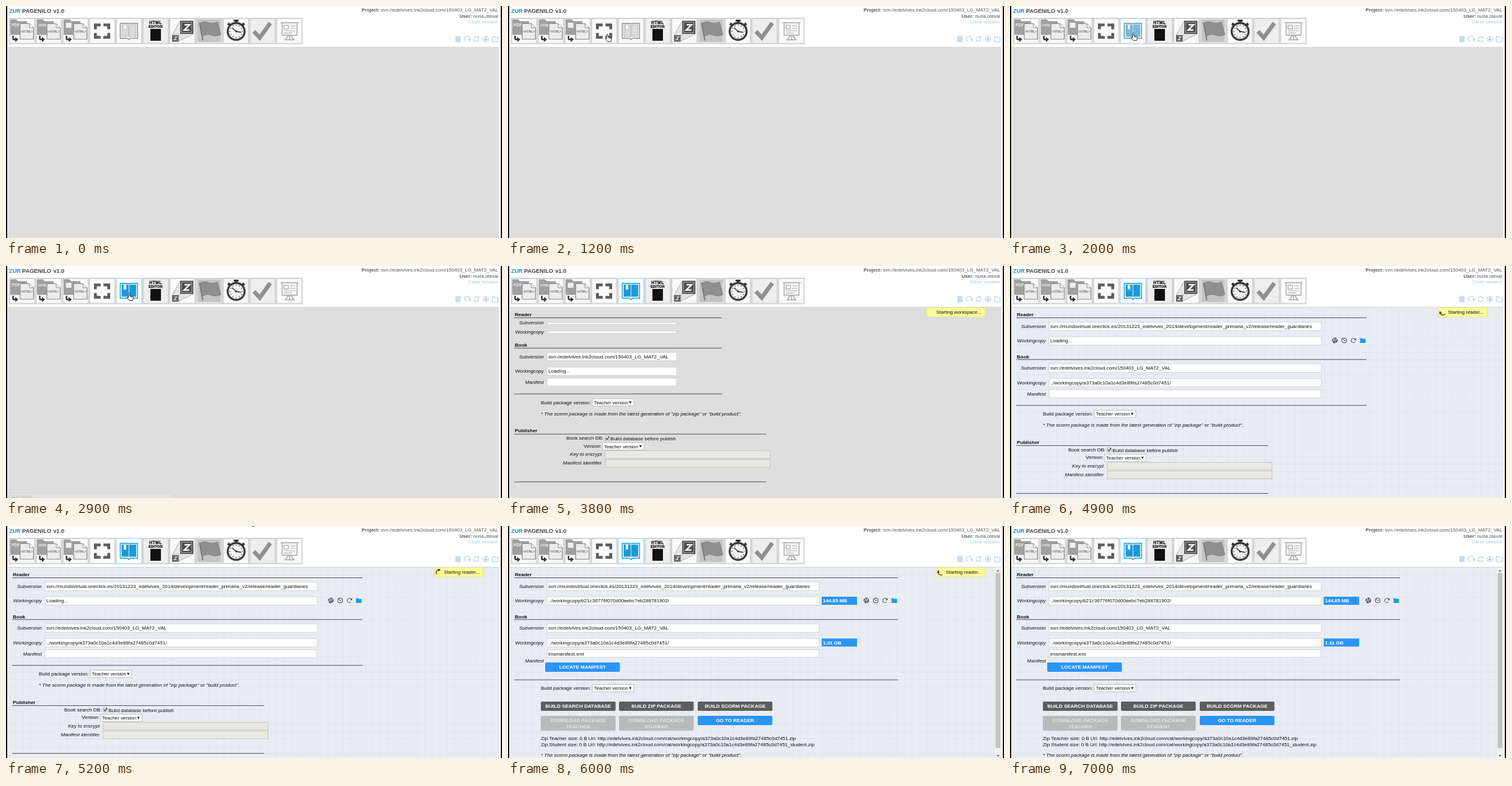
Recreate the animation shown at these times as an HTML page. Size 800x374 px, loop 7.1 s.

```html
<!DOCTYPE html>
<html lang="en">
<head>
<meta charset="utf-8">
<title>Workspace start</title>
<style>
html, body { margin: 0; width: 100%; height: 100%; overflow: hidden; background: #fff; }
svg { display: block; width: 800px; height: 374px; }
text { font-family: "Liberation Sans", Arial, sans-serif; font-size: 8px; fill: #111; white-space: pre; }
.b { font-weight: bold; }
.i { font-style: italic; }
.head { font-size: 7.8px; fill: #555; }
.link { font-size: 7.8px; fill: #9ccbee; }
</style>
</head>
<body>
<svg id="stage" viewBox="0 0 800 374" xmlns="http://www.w3.org/2000/svg"></svg>
<script>
const LOOP = 7100;
const BLUE = "#2a95f5";

const esc = s => s.replace(/&/g, "&amp;").replace(/</g, "&lt;").replace(/>/g, "&gt;");
const text = (x, y, s, cls = "", more = "") => `<text x="${x}" y="${y}" class="${cls}" ${more}>${esc(s)}</text>`;
const endText = (x, y, s, cls = "") => text(x, y, s, cls, 'text-anchor="end"');
const midText = (x, y, s, cls, more) => text(x, y, s, cls, `text-anchor="middle" ${more}`);
const rect = (x, y, w, h, fill, more = "") => `<rect x="${x}" y="${y}" width="${w}" height="${h}" fill="${fill}" ${more}/>`;
const path = (d, fill = "none", stroke = "none", w = 1, more = "") =>
  `<path d="${d}" fill="${fill}" stroke="${stroke}" stroke-width="${w}" ${more}/>`;
const group = (id, body, more = "") => `<g id="${id}" ${more}>${body}</g>`;
const at = (x, y, body, scale = 1) => `<g transform="translate(${x} ${y}) scale(${scale})">${body}</g>`;

// Toolbar icons, drawn in a 43 x 42 cell
const cellX = i => 4.4 + 43.1 * i;
const cell = (i, fill, stroke = "#d2d2d2") =>
  rect(cellX(i) + 1, 20, 41.1, 40.5, fill, `stroke="${stroke}" stroke-width="2"`);

function convertIcon(label) {
  return path("M3 3h9l2.5 3H29v21H3z", "#a0a0a0", "#8c8c8c", .8) + label +
    path("M18.5 9.5h15l6.5 6.5v18.5H18.5z", "#ececec", "#8b8b8b", 1.2) + path("M33.5 9.5V16H40", "#fafafa", "#8b8b8b") +
    midText(29.3, 24.3, "<HTML>", "b", 'style="font-size:4.8px;fill:#777"') +
    path("M7 29v4.5q0 1.5 1.5 1.5h3", "none", "#333", 2.4) + path("M10.5 31l5 4-5 4z", "#333");
}

function bookIcon(main, page) {
  return path("M7.5 9H20l1.5 1.2L23 9h12.5v24H24l-2.5 2-2.5-2H7.5z", "#fff", main, 1.4) +
    path("M10 11.2h9.8l1 1v18H10zM33 11.2h-9.8l-1 1v18H33z", page, main, .6) +
    path("M13 11h4.2v9.5l-2.1-2.3-2.1 2.3z", "#fff", main, .5);
}

function watchIcon() {
  let ticks = "";
  for (let k = 0; k < 12; k++) ticks += `<path d="M0-11.2V-9" stroke="#444" transform="rotate(${k * 30})"/>`;
  return at(22, 22, rect(-4, -19, 8, 3, "#333") + rect(-2, -17, 4, 4, "#333") +
    path("M-13-13l3 3M13-13l-3 3", "none", "#333", 4) +
    '<circle r="13.7" fill="#f3f3f3" stroke="#3a3a3a" stroke-width="3.2"/>' + ticks +
    path("M-6.5-6L0 0l8 1.5", "none", "#333", 1.5) + '<circle r="1.6" fill="#333"/>');
}

const zTile = size => at(0, 0, rect(0, 0, 21, 21, "#4b4b4b") +
  rect(2.2, 2.2, 16.6, 16.6, "none", 'stroke="#b5b5b5" stroke-width="1"') +
  path("M7 6.2h8.2L6.4 14.8h8.4", "none", "#eee", 2.4), size / 21);

const fileLabel = s => text(4.5, 14, s, "b", `style="font-size:${s.length > 3 ? 5.5 : 7}px;fill:#eee"`);
const icons = [
  convertIcon(fileLabel("PDF")),
  convertIcon(fileLabel("HTML")),
  convertIcon(rect(6, 8, 9, 8, "#eee")),
  path("M10.5 18.5v-7h8.5M23.5 11.5H32v7M32 24.5v7h-8.5M19 31.5h-8.5v-7", "none", "#5c5c5c", 4.6),
  bookIcon("#8d8d8d", "#dcdcdc"),
  midText(21.5, 9.8, "HTML", "b", 'stroke="#111" stroke-width=".3" style="font-size:6.5px;letter-spacing:.5px"') +
    midText(21.5, 15.8, "EDITOR", "b", 'stroke="#111" stroke-width=".3" style="font-size:5.6px;letter-spacing:.3px"') +
    rect(13, 18, 17, 19, "#111"),
  path("M18 5L5 28v10h10l24-12V5z", "#e4e4e4", "#a5a5a5", .9) + path("M18 26L5 38", "none", "#a5a5a5", .9) +
    at(18, 5, zTile(21)) + at(5, 28, zTile(10.5)),
  rect(2.5, 2.5, 38, 37, "#c4c4c4") + path("M6 8l5.5 28.5", "none", "#7c7c7c", 2) +
    path("M7 8.5q7-4 13-1 7 3 15-1l5.5 20.5q-8 4-15 1-7-3-14.5 1.5z", "#8f8f8f", "#7c7c7c", .8),
  watchIcon(),
  path("M7.5 22l9.5 10L34 8.5", "none", "#909090", 6.6),
  path("M7.5 8h29M10 9v19h24V9M22 28v7M14 35.5h16M15.5 35l5-7M28.5 35l-5-7", "none", "#a4a4a4", 1.4) +
    rect(13, 12, 7, 6, "none", 'stroke="#a4a4a4" stroke-width="1.2"') +
    path("M23 13h8M23 17h8M13 21h18M13 24.5h13", "none", "#a4a4a4", 1.2)
];

const toolbar = () => icons.map((icon, i) =>
  cell(i, i === 5 || i === 9 ? "#eee" : "#fafafa") + at(cellX(i), 19, icon)).join("");

const sync = c => path("M-3.3-1A3.5 3.5 0 0 1 2.8-2.2M3.3 1A3.5 3.5 0 0 1-2.8 2.2", "none", c, 1) +
  path("M3.8-4v3H1zM-3.8 4V1H-1z", c);
const redo = c => path("M2.4 2.5A3.5 3.5 0 1 1 3.2-1.2", "none", c, 1) + path("M4.2-4v3.6H.9z", c);

function header() {
  const c = "#b0d0ec";
  const small = [
    path("M-3-2.5h6v6.5h-6zM-4-3.8h8M-1-1v4M1-1v4", "#d7e6f3", c, 1),
    path("M-2 3.2A3.8 3.8 0 1 1 3.4 1", "none", c, 1) + path("M1.5 0h4L3.5 3.5z", c),
    sync(c),
    `<circle r="3.8" fill="none" stroke="${c}"/>` + path("M-1-2.5h2V0h2L0 2.8-3 0h2z", c),
    path("M-4-3.5h3l1 1.5h4v6h-8z", "none", c, 1)
  ];
  return text(5, 11, "ZUR", "b", 'style="font-size:9.1px;fill:#1596d1"') +
    text(26, 11, "PAGENILO", "b", 'style="font-size:9.1px;fill:#444"') +
    text(76.3, 11, "v1.0", "b", 'style="font-size:9.1px;fill:#444"') +
    `<text x="793.8" y="9" class="head" text-anchor="end"><tspan class="b">Project:</tspan> svn://edelvives.ink2cloud.com/150403_LG_MAT2_VAL</text>` +
    `<text x="793.8" y="18.5" class="head" text-anchor="end"><tspan class="b">User:</tspan> nuria.otexal</text>` +
    endText(793.5, 28, "Close session", "link") +
    small.map((s, k) => at(729 + 15 * k, 53.3, s, 1.12)).join("");
}

// Form parts
const rule = (y, x2) => rect(10, y - .5, x2 - 10, 1, "#555");
const input = (x, y, w, h, s = "") =>
  rect(x, y, w, h, "#fff", 'stroke="#c8c8c8" stroke-width=".7"') + (s ? text(65, y + 9.4, s) : "");
const dimInput = y => rect(157, y, 265.5, 12.5, "#e9e8e2", 'stroke="#bdbdb8" stroke-width=".8"');
const select = (x, y) => rect(x, y, 67, 11.6, "#fff", 'stroke="#aaa" stroke-width=".7"') +
  text(x + 2.5, y + 8.7, "Teacher version", "", 'style="font-size:7.8px"') + path(`M${x + 59} ${y + 4.2}h4.4l-2.2 3.8z`, "#222");
const label = (y, s, x = 57.8) => endText(x, y, s, "i");
const button = (x, y, lines, fill, ink = "#fff") =>
  rect(x, y, 120.5, lines.length > 1 ? 24 : 15, fill, 'rx="2"') +
  lines.map((s, k) => midText(x + 60.2, y + 10.3 + k * 9.4, s, "b", `style="fill:${ink}"`)).join("");
const badge = (y, s) => rect(506, y, 57, 13, BLUE) + text(508, y + 9.4, s, "b", 'style="fill:#fff"');
const note = y => text(53, y, '* The scorm package is made from the latest generation of "zip package" or "build product".', "i");

function rowIcons(x, y) {
  const c = "#444";
  const parts = [
    '<circle r="3.6" fill="none" stroke="#444" stroke-width="1.7" stroke-dasharray="4 1"/>' +
      path("M-2 2L0-2 2 2z", "none", c, 1),
    '<circle r="4" fill="none" stroke="#444"/>' + path("M-3-3L0 0h2", "none", c, 1),
    redo(c),
    path("M-4.5-3.5h3.5l1 1h4.5v6.5h-9z", "#1c9be0")
  ];
  return parts.map((p, k) => at(x + 15 * k, y, p)).join("");
}

const bookUrl = "svn://edelvives.ink2cloud.com/150403_LG_MAT2_VAL";
const readerUrl = "svn://mundovirtual.oneclick.es/20131223_edelvives_2014/development/reader_primaria_v2/release/reader_guardianes";
const bookHash = "a373a0c10a1c4d3e89fa27485c0d7451";

const bookRows = (w, dir) => label(148.5, "Subversion") + input(63, 139.4, w, 13.4, bookUrl) +
  label(172, "Workingcopy") + input(63, 163, w, 13.4, dir);

const lowerForm = () => text(53, 222.5, "Build package version:") + select(136, 214) + note(240.7) +
  text(11, 268, "Publisher", "b") + rule(271, 416.5) +
  endText(154, 280.3, "Book search DB:") +
  rect(157, 274.8, 6, 6, "#fff", 'stroke="#888" stroke-width=".7"') + path("M158 277.5l1.8 2 3-4.3", "none", "#222", 1.2) +
  text(165.3, 281, "Build database before publish") +
  endText(151, 292.7, "Version:") + select(152.5, 284.8) +
  label(306, "Key to encrypt", 151.2) + dimInput(297.8) +
  label(320.3, "Manifest identifier", 151.2) + dimInput(312) + rule(348, 416.5);

function formEmpty() {
  return text(11, 81, "Reader", "b") + rule(83.5, 345) +
    label(94.3, "Subversion") + input(63, 91, 209, 3.3) + label(108.5, "Workingcopy") + input(63, 105, 209, 3.3) +
    text(11, 130, "Book", "b") + rule(132.3, 345) +
    bookRows(209, "Loading...") + label(190, "Manifest") + input(63, 181, 209, 12.6) + rule(206.2, 345.5) + lowerForm();
}

function readerRows(dir, x2) {
  return text(11, 81, "Reader", "b") + rule(83.5, x2) +
    label(100, "Subversion") + input(63, 90.6, 439, 13.4, readerUrl) +
    label(122.8, "Workingcopy") + input(63, 114, 439, 13.4, dir) + rowIcons(x2 - 51, 120) +
    at(0, 18.5, text(11, 130, "Book", "b") + rule(132.3, x2) + bookRows(439, `../workingcopy/${bookHash}/`));
}

function formLoading() {
  return readerRows("Loading...", 575) +
    at(0, 18.5, label(190, "Manifest") + input(63, 181, 438.5, 12.6) + rule(206.2, 575) + lowerForm());
}

function formReady() {
  const zip = "http://edelvives.ink2cloud.com/cat/workingcopy/" + bookHash;
  const dark = "#5e5e5e", pale = "#bababa";
  return readerRows("../workingcopy/b21c36776f070d00aebc7eb288781902/", 629) +
    badge(114, "144.85 MB") + badge(181.3, "1.31 GB") +
    input(63.5, 199.5, 438, 12.3, "imsmanifest.xml") + label(219.7, "Manifest") +
    button(60, 220, ["LOCATE MANIFEST"], BLUE) + rule(248, 629) +
    text(53, 264, "Build package version:") + select(136, 255.6) +
    button(53, 283, ["BUILD SEARCH DATABASE"], dark) + button(179, 283, ["BUILD ZIP PACKAGE"], dark) +
    button(306, 283, ["BUILD SCORM PACKAGE"], dark) +
    button(53, 306, ["DOWNLOAD PACKAGE", "TEACHER"], pale, "#e6e6e6") +
    button(179, 306, ["DOWNLOAD PACKAGE", "STUDENT"], pale, "#e6e6e6") +
    button(306, 306, ["GO TO READER"], BLUE) +
    text(53, 345, `Zip Teacher size: 0 B Url: ${zip}.zip`) +
    text(53, 354.5, `Zip Student size: 0 B Url: ${zip}_student.zip`) + note(372) +
    rect(785.5, 67, 9.5, 307, "#f1f1f1") + rect(786.5, 76, 7.5, 282, "#c3c3c3") +
    path("M788 73.5l2.3-3 2.3 3zM788 369l2.3 3 2.3-3z", "#666");
}

const toast = (x, s) => rect(x, 67, 769.5 - x, 15, "#fcf99b", 'stroke="#e6e08a" stroke-width=".8"') +
  text(x + 15.3, 77.2, s, "", 'style="font-size:7.8px"');

const hand = path("M-1 1.2Q0-.6 1.1 1.2V5l5 1.2Q7 6.6 6.8 8L6 12.6H.6L-3.2 8Q-3.4 6.6-1 8z", "#fff", "#222", .9) +
  path("M2.8 5.8v2M4.6 6.1v2", "none", "#222", .7);
const arrow = path("M0 0v10.5l2.4-2.2 1.7 3.7 1.6-.7-1.6-3.6h3.3z", "#fff", "#222", .8);

document.getElementById("stage").innerHTML =
  `<defs><pattern id="mesh" x="3" y="67" width="12" height="12" patternUnits="userSpaceOnUse">
    ${rect(0, 0, 12, 12, "#e9ecf2")}${path("M0 .5H12M.5 0V12", "none", "#e0e4ed", .8)}</pattern></defs>` +
  rect(0, 0, 800, 374, "#fff") + header() + toolbar() +
  group("hover", cell(4, "#fff", "#bfe2f3") + at(cellX(4), 19, bookIcon("#1a9ad7", "#1a9ad7"))) +
  rect(3, 66.3, 792.5, 308, "#dedede") +
  group("grid", rect(3, 66.3, 792.5, 308, "url(#mesh)")) + rect(3, 66, 792.5, 1, "#d6d6d6") +
  group("status", rect(3, 367, 265, 7, "#e4e4e4", 'stroke="#cfcfcf" stroke-width=".6"') +
    text(4, 374, "Conectando...", "", 'style="font-size:7px;fill:#bbb"')) +
  group("empty", formEmpty()) + group("tools", rowIcons(294.5, 106)) +
  group("loading", formLoading()) + group("ready", formReady()) +
  group("toastWork", toast(675.5, "Starting workspace...")) + group("toastRead", toast(691, "Starting reader...")) +
  group("spinner", path("M3 3A4.2 4.2 0 0 1-4.2 0", "none", "#333", 1.3) + path("M-6.4 1L-3.9-3.4-1.8.9z", "#333")) +
  group("tip", rect(397.5, 0, 2.5, 1, "#222")) +
  rect(0, 0, 2, 374, "#111") + rect(798, 0, 2, 374, "#111") +
  group("hand", hand) + group("arrow", arrow);

const el = id => document.getElementById(id);
const show = (id, on) => el(id).setAttribute("visibility", on ? "visible" : "hidden");
const place = (id, x, y, turn = 0) => el(id).setAttribute("transform", `translate(${x} ${y}) rotate(${turn})`);

// Pointer route: time, x, y
const route = [[200, 190, 316], [900, 159, 66], [1000, 158, 56], [1200, 160, 45], [1500, 198.5, 43], [3200, 198.5, 43], [3500, 225, -16]];

function pointer(t) {
  const k = route.findIndex(p => p[0] > t);
  if (k < 1) return null;
  const [t0, x0, y0] = route[k - 1], [t1, x1, y1] = route[k];
  const u = (t - t0) / (t1 - t0);
  return [x0 + (x1 - x0) * u, y0 + (y1 - y0) * u];
}

function draw(ms) {
  const t = Math.floor(ms / 100) * 100;
  const within = (a, b = LOOP) => t >= a && t < b;
  const p = pointer(t);
  show("hand", p && p[1] < 62);
  show("arrow", p && p[1] >= 62);
  if (p) { place("hand", ...p); place("arrow", ...p); }

  el("hover").setAttribute("opacity", Math.max(0, Math.min(1, (t - 1800) / 400)));
  show("status", within(2900, 3300));
  show("grid", within(3900));
  show("empty", within(3600, 4900));
  show("tools", within(3900, 4900));
  show("loading", within(4900, 6000));
  show("ready", within(6000));
  show("toastWork", within(3600, 4900));
  show("toastRead", within(4900, 6400));
  show("spinner", within(3900, 6400));
  place("spinner", t < 4900 ? 683 : 698, 74.8, (t - 3900) * 450 / 1300);
  show("tip", within(5100, 5400));
}

const start = performance.now();
function tick() {
  draw((performance.now() - start) % LOOP);
  requestAnimationFrame(tick);
}
tick();
</script>
</body>
</html>
```
